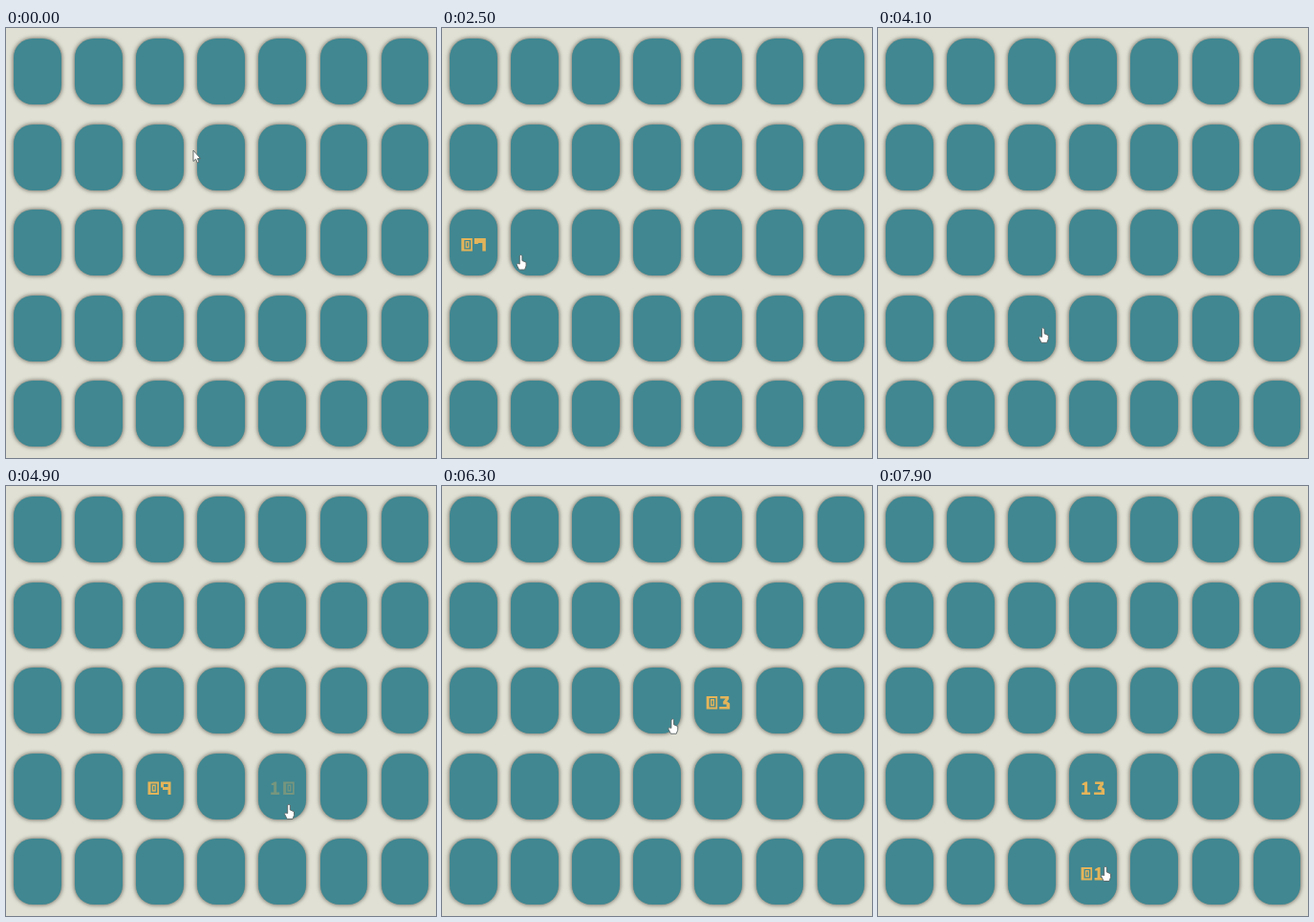
Recreate the animation shown at these times as an HTML page. Size 450 by 450 pixels, loop 8 s.

```html
<!DOCTYPE html>
<html lang="en">
<head>
<meta charset="utf-8">
<title>Memory game</title>
<style>
  html, body { margin: 0; height: 100%; overflow: hidden; background: #e0e0d4; }
  .card {
    position: absolute; width: 49.5px; height: 69.4px; border-radius: 20px;
    background: #408791; box-shadow: 0 0 4px .6px #6c6a60; filter: blur(.5px);
  }
  svg { position: absolute; left: 0; top: 0; }
  .number { fill: #e3b45a; fill-rule: evenodd; filter: blur(.3px); }
  .cursor { fill: #fff; stroke: #5a6464; stroke-width: .9; stroke-linejoin: round; }
</style>
</head>
<body>
<svg width="450" height="450" viewBox="0 0 450 450">
  <g id="numbers" class="number"></g>
  <path id="cursor" class="cursor"/>
</svg>
<script>
const LOOP = 8000, STEP = 100, FADE = 300;
const COLS = 7, ROWS = 5, PITCH_X = 64.1, PITCH_Y = 89.5, LEFT = 8, TOP = 11;
const cardX = col => LEFT + PITCH_X * col;
const cardY = row => TOP + PITCH_Y * row;

// Stencil digits in a 12 by 15 box
const digits = {
  0: 'M0 1H11.5V14.5H0ZM3 3V12.5H9.8V3ZM4.3 4H8.3V11.3H4.3ZM5.6 5.5V9.8H7V5.5Z',
  1: 'M1 3L4.5 1H6.5V12H9.5V14.5H0.5V12H3.5V4.5H1Z',
  3: 'M1 1H10V4L8 6.5L11 8.5V14.5H0V12H7.5V9.5H4V6.5L6.5 3.5H1Z',
  7: 'M0 1H12V14.5H8.5V6H4V7H0Z',
  9: 'M0 1H10.5V14.5H7.5V9.5H2V7H0ZM3 3.5V6.5H7.5V3.5Z'
};
const hand = 'M-1.3 1Q0 -1 1.3 1V6L5.5 7.8V11.5L4 15.5H-1.8L-4.5 10.2Q-3.8 8.2 -1.3 9.6Z';
const arrow = 'M0 0V11.5L2.6 9.2L4.3 13L6 12.2L4.4 8.6H7.5Z';

// Pointer moves; one with a number ends in a click that turns that card
const moves = [
  { from: 0, to: 200, x: 191, y: 222 },
  { from: 500, to: 600, x: 198, y: 133 },
  { from: 600, to: 800, x: 212, y: 219 },
  { from: 1020, to: 1900, x: 39, y: 236, sag: 18 },
  { from: 2450, to: 2700, x: 160, y: 240 },
  { from: 3400, to: 4200, x: 173, y: 315 },
  { from: 4500, to: 4800, x: 296, y: 333 },
  { from: 5200, to: 5900, x: 287, y: 240 },
  { from: 6100, to: 6500, x: 226, y: 245 },
  { from: 6600, to: 6800, x: 205, y: 291 },
  { from: 6800, to: 6900, x: 244, y: 297 },
  { from: 7000, to: 7300, x: 244, y: 312 },
  { from: 7350, to: 7600, x: 238, y: 398 }
];
const origin = { x: 196, y: 128 };
const texts = ['07', '11', '09', '10', '03', '19', '13', '01'];
const clicks = moves.filter(m => m.to - m.from >= 250);

for (let i = 0; i < COLS * ROWS; i++) {
  const card = document.createElement('div');
  card.className = 'card';
  card.style.left = cardX(i % COLS) + 'px';
  card.style.top = cardY(Math.floor(i / COLS)) + 'px';
  document.body.prepend(card);
}

// A turned pair closes as the pointer leaves for the next pair
const reveals = clicks.map(({ to, x, y }, i) => {
  const nextPair = clicks[i - i % 2 + 2];
  return {
    text: texts[i],
    x: cardX(Math.floor((x - LEFT) / PITCH_X)) + 12.3,
    y: cardY(Math.floor((y - TOP) / PITCH_Y)) + 29,
    show: to + STEP,
    hide: nextPair ? nextPair.from : LOOP + FADE
  };
});

const numbers = document.getElementById('numbers');
const cursor = document.getElementById('cursor');
numbers.innerHTML = reveals.map(({ text, x, y }) =>
  `<g role="img" aria-label="${text}" transform="translate(${x} ${y})">
    <path d="${digits[text[0]]}"/><path d="${digits[text[1]]}" transform="translate(13.5 0)"/></g>`
).join('');

const clamp = v => Math.max(0, Math.min(1, v));
const easeOut = k => 1 - (1 - k) ** 2;
const ramp = (t, start) => clamp((t - start + STEP) / FADE);

function pointerAt(t) {
  let { x, y } = origin;
  for (const m of moves) {
    const k = easeOut(clamp((t - m.from) / (m.to - m.from)));
    x += (m.x - x) * k;
    y += (m.y - y) * k + (m.sag || 0) * 4 * k * (1 - k);
  }
  return [x, y];
}

function overCard(x, y) {
  const dx = (x - LEFT) % PITCH_X, dy = (y - TOP) % PITCH_Y;
  return dx >= 0 && dx <= 50 && dy >= 0 && dy <= 70;
}

function draw(now) {
  const t = Math.floor(now % LOOP / STEP) * STEP;
  reveals.forEach(({ show, hide }, i) => {
    numbers.children[i].setAttribute('opacity', ramp(t, show) - ramp(t, hide));
  });
  const [x, y] = pointerAt(t);
  cursor.setAttribute('d', overCard(x, y) ? hand : arrow);
  cursor.setAttribute('transform', `translate(${x} ${y})`);
}

const start = performance.now();
function tick() {
  draw(performance.now() - start);
  requestAnimationFrame(tick);
}
tick();
</script>
</body>
</html>
```
